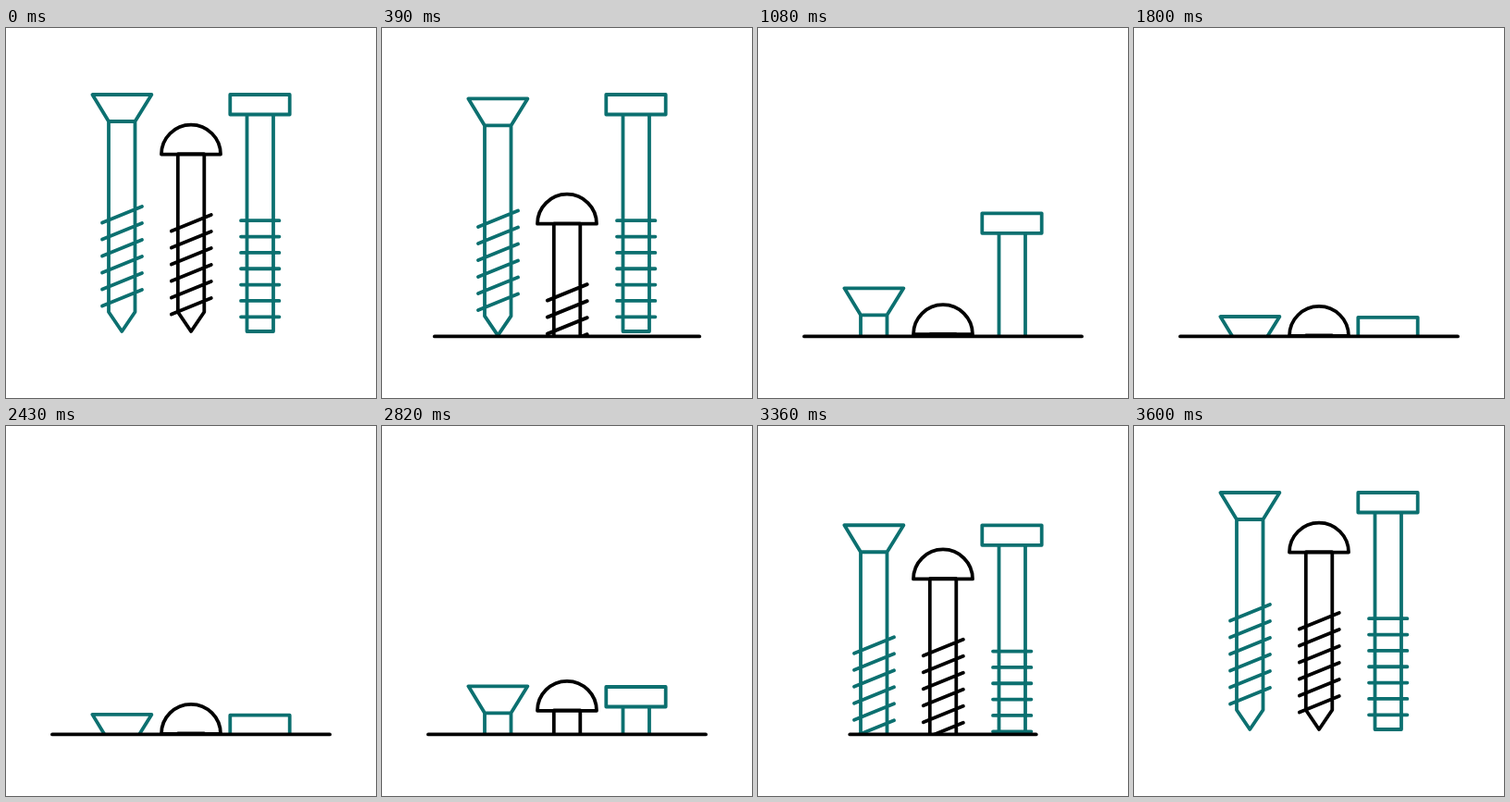
These frames come from a looping animation (400x400 px, 3.63 s). An HTML page:

```html
<!DOCTYPE html>
<html lang="en">
<head>
<meta charset="utf-8">
<title>Screws</title>
<style>
  html, body { margin: 0; width: 100%; height: 100%; overflow: hidden; background: #fff; }
  svg { display: block; width: 100%; height: 100%; }
</style>
</head>
<body>
<svg viewBox="0 0 400 400" fill="none" stroke="#000" stroke-width="3.8" stroke-linecap="round" stroke-linejoin="round">
  <clipPath id="above"><path d="M0 0H400V333.5H0Z"/></clipPath>
  <g clip-path="url(#above)">
    <path id="flat" stroke="#0c7070"/>
    <path id="round"/>
    <path id="bolt" stroke="#0c7070"/>
  </g>
  <path id="ground"/>
</svg>
<script>
const LOOP = 3630, STEP = 30, END = 3600, TRAVEL = 1200, GROUND = 500;
const $ = id => document.getElementById(id);

const threads = (count, x, y, gap, dx, dy) =>
  Array.from({ length: count }, (_, i) => `M${x} ${y + i * gap}l${dx} ${dy}`).join('');

const shaft = (x, top) => `M${x} ${top}V307l14.25 21 14.25 -21V${top}Z`;

$('flat').setAttribute('d',
  'M93.4 72H157.4L139.5 101H111Z' + shaft(111, 101) + threads(6, 104, 210.5, 18, 43, -17.5));
$('round').setAttribute('d',
  'M168 136.6a32 32 0 0 1 64 0Z' + shaft(185.8, 136.2) + threads(6, 178.8, 219.5, 18, 43, -17.5));
$('bolt').setAttribute('d',
  'M242.3 72H306.7V93.5H242.3ZM260.5 93.5H289V328H260.5Z' + threads(7, 254, 208.2, 17.35, 41.4, 0));

const screws = [
  { el: $('round'), delay: 0, depth: 196.3 },
  { el: $('flat'), delay: 300, depth: 240 },
  { el: $('bolt'), delay: 600, depth: 240.8 }
];

// cubic-bezier(.333, 0, .355, 1)
function ease(x) {
  if (x <= 0) return 0;
  if (x >= 1) return 1;
  let lo = 0, hi = 1, u;
  for (let i = 0; i < 24; i++) {
    u = (lo + hi) / 2;
    const v = 1 - u;
    if (3 * v * v * u * 0.333 + 3 * v * u * u * 0.355 + u * u * u < x) lo = u;
    else hi = u;
  }
  return u * u * (3 - 2 * u);
}

// Screws sink one after another, then rise together with the easing reversed.
function draw(now) {
  const t = Math.floor(now % LOOP / STEP) * STEP;
  const left = END - t;
  for (const { el, delay, depth } of screws) {
    const sunk = ease(Math.min(t - delay, left) / TRAVEL);
    el.setAttribute('transform', `translate(0 ${depth * sunk})`);
  }
  const half = 150 * ease(Math.min(t, left) / GROUND);
  $('ground').setAttribute('d', half ? `M${200 - half} 333.4H${200 + half}` : '');
}

const start = performance.now();
function tick() {
  draw(performance.now() - start);
  requestAnimationFrame(tick);
}
tick();
</script>
</body>
</html>
```
